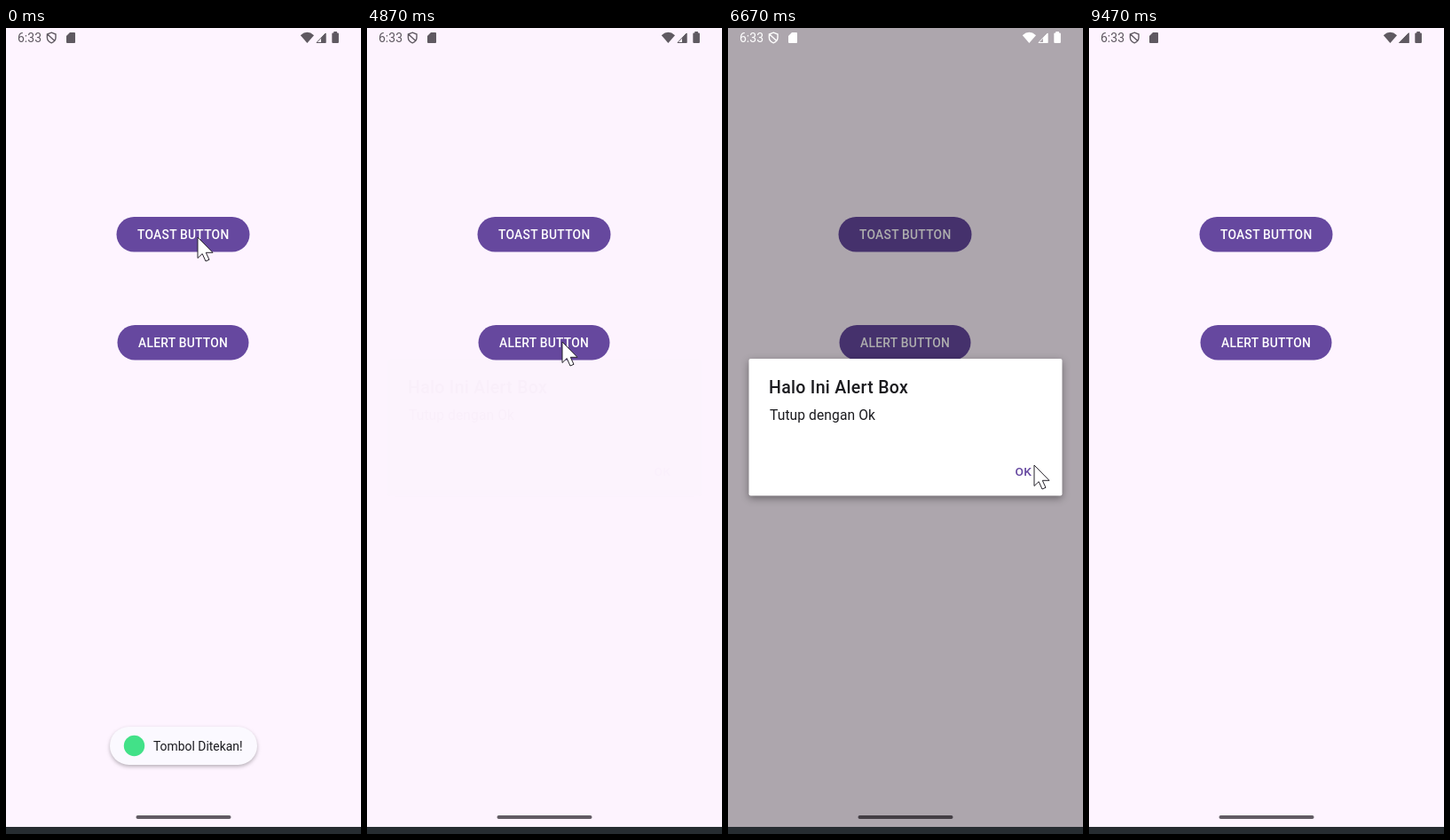
Recreate the animation shown at these times as an HTML page. Size 400 by 909 pixels, loop 9.54 s.

```html
<!DOCTYPE html>
<html lang="id">
<head>
<meta charset="utf-8">
<title>Toast dan Alert</title>
<style>
  html, body { margin: 0; width: 100%; height: 100%; overflow: hidden; background: #fef4ff; }
  svg { display: block; width: 400px; height: 909px; font-family: Roboto, sans-serif; }
  .button { fill: #66489f; }
  .label { font-size: 13.8px; font-weight: 500; letter-spacing: .27px; fill: #fff; }
  #toast { filter: drop-shadow(0 2px 2px rgba(0, 0, 0, .28)); }
  #dialog { filter: drop-shadow(0 3px 4px rgba(0, 0, 0, .38)); }
  .line { fill: none; stroke: currentColor; }
</style>
</head>
<body>
<svg viewBox="0 0 400 909">
  <rect width="400" height="909" fill="#fef4ff"/>
  <rect class="button" x="124.5" y="213" width="150" height="39.5" rx="19.75"/>
  <text class="label" x="148" y="238.3">TOAST BUTTON</text>
  <rect class="button" x="125.5" y="335" width="148" height="39.5" rx="19.75"/>
  <text class="label" x="149" y="360">ALERT BUTTON</text>
  <rect x="146.5" y="888" width="107" height="4" rx="2" fill="#625b64"/>

  <g id="toast">
    <rect x="117" y="788" width="166" height="43" rx="21.5" fill="#fbf9ff"/>
    <circle cx="144.5" cy="809.5" r="11.7" fill="#42e188"/>
    <text x="166" y="815" font-size="13.9" fill="#1b1b1f">Tombol Ditekan!</text>
  </g>

  <rect id="dim" width="400" height="901"/>

  <g id="status" fill="currentColor">
    <text x="13" y="15.7" font-size="14">6:33</text>
    <path class="line" stroke-width="1.4" d="M51.2 5.2L56 7v3.8c0 2.8-2 5-4.8 6c-2.8-1-4.8-3.2-4.8-6V7zM47 7.2l8 7.6"/>
    <path d="M72 5h5q1 0 1 1v10q0 1-1 1h-8q-1 0-1-1V9z"/>
    <path d="M331.8 8.2q7.6-6.8 15.2 0L339.4 17z"/>
    <path class="line" d="M350 16.5L360 6v10.5z"/>
    <path d="M355 11.2L360.4 5.5V17H355z"/>
    <path id="signal" d="M348.8 17L360.5 5V17z"/>
    <path d="M369.3 4h3.6v1.4h1q1 0 1 1V16q0 1-1 1h-5.6q-1 0-1-1V6.4q0-1 1-1h1z"/>
  </g>

  <g id="dialog">
    <rect id="card" x="23.5" y="373" width="353" height="154.5" rx="2"/>
    <text x="46" y="411.7" font-size="19.5" font-weight="500" letter-spacing=".3" fill="#1b1b1f">Halo Ini Alert Box</text>
    <text x="47" y="442" font-size="15.6" letter-spacing=".1" fill="#1b1b1f">Tutup dengan Ok</text>
    <text x="323.4" y="505.4" font-size="13.7" font-weight="500" letter-spacing=".5" fill="#6547a0">OK</text>
  </g>

  <rect y="901" width="400" height="8" fill="#262c31"/>
  <path id="cursor" d="M0 0V23.5L5.2 18.6L9 27L13 25.3L9.3 17.3H17z" fill="#fff" stroke="#25222a" stroke-linejoin="round"/>
</svg>
<script>
  const LOOP = 9540, FRAME = 200 / 3;
  const { toast, dim, signal, dialog, card, cursor } =
    Object.fromEntries([...document.querySelectorAll('[id]')].map(el => [el.id, el]));
  const statusBar = document.getElementById('status');

  const ramp = (t, from, to) => Math.min(1, Math.max(0, (t - from) / (to - from)));
  const smooth = k => k * k * (3 - 2 * k);
  const mix = (a, b, k) => a + (b - a) * k;

  // Cursor moves: start time, end time, target x, target y
  const start = [216, 236];
  const moves = [
    [1000, 1600, 233, 367],
    [3300, 3950, 220, 354],
    [5300, 5950, 341, 488],
    [6070, 6270, 345, 493],
  ];

  function cursorAt(t) {
    let [x, y] = start;
    for (const [from, to, tx, ty] of moves) {
      const k = smooth(ramp(t, from, to));
      x = mix(x, tx, k);
      y = mix(y, ty, k);
    }
    return [x, y];
  }

  function draw(t) {
    const shade = .32 * (t < 6700 ? ramp(t, 4865, 4998) : 0);
    const white = ramp(t, 5000, 5300) - ramp(t, 7070, 7400);
    const tone = [95, 89, 97].map(c => Math.round(mix(c * (1 - shade), 255, white)));

    toast.style.opacity = 1 - ramp(t, 850, 1150);
    dim.style.opacity = shade;
    statusBar.style.color = `rgb(${tone})`;
    signal.style.opacity = t < 8500 ? 0 : 1;
    dialog.style.opacity = ramp(t, 4865, 4998) * (1 - ramp(t, 6667, 6787));
    card.style.fill = `hsl(276 50% ${mix(98.2, 100, ramp(t, 5000, 5400))}%)`;
    cursor.style.opacity = t < 7500 ? 1 : 0;
    cursor.setAttribute('transform', `translate(${cursorAt(t)})`);
  }

  // The picture advances at 15 steps per second
  function tick() {
    const t = performance.now() % LOOP;
    draw(Math.floor((t + 3.4) / FRAME) * FRAME);
    requestAnimationFrame(tick);
  }
  tick();
</script>
</body>
</html>
```
